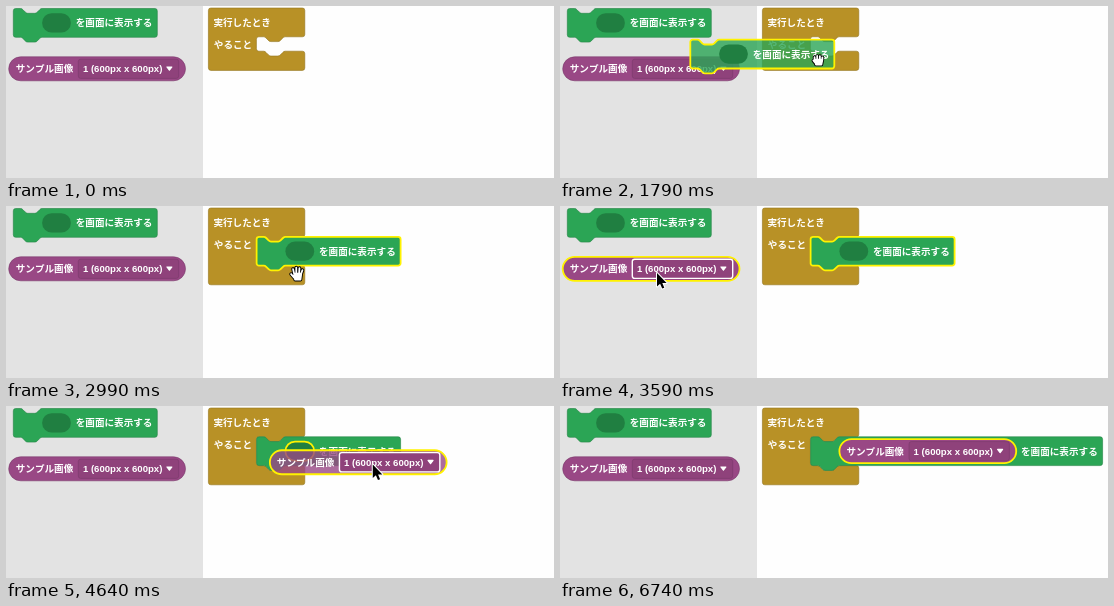
Animation, 548 px wide and 172 px high, one loop 7.04 s. Source, as an HTML page with a canvas:

```html
<!DOCTYPE html>
<html lang="ja">
<head>
<meta charset="utf-8">
<title>Block editor</title>
<style>
html, body { margin: 0; width: 100%; height: 100%; overflow: hidden; background: #fefefe; }
canvas { display: block; }
</style>
</head>
<body>
<canvas id="stage" width="548" height="172"></canvas>
<script>
const ctx = document.getElementById('stage').getContext('2d');
const LOOP = 7040, STEPS = 47;
const GLOW = '#fff200';
const GREEN = ['#2ba555', '#228444'], GOLD = ['#b89126', '#93741e'], PURPLE = ['#994885', '#7a396a'];

// Outline pieces: notch drawn rightwards and leftwards, rounded corners
const notchR = 'c1.2 0 1.8.6 2.4 1.2l2.4 2.4c.6.6 1.2 1.2 2.4 1.2h7.2c1.2 0 1.8-.6 2.4-1.2l2.4-2.4c.6-.6 1.2-1.2 2.4-1.2';
const notchL = notchR.replace(/([cl])1.2 0 1.8/, '$1-1.2 0-1.8')
  .replace('.6 2.4 1.2l2.4 2.4c.6.6 1.2 1.2 2.4 1.2h7.2c1.2 0 1.8-.6 2.4-1.2l2.4-2.4c.6-.6 1.2-1.2 2.4-1.2',
    '.6-2.4 1.2l-2.4 2.4c-.6.6-1.2 1.2-2.4 1.2h-7.2c-1.2 0-1.8-.6-2.4-1.2l-2.4-2.4c-.6-.6-1.2-1.2-2.4-1.2');
const turn = (dx, dy, sweep = 1) => `a2.4 2.4 0 0 ${sweep} ${dx * 2.4} ${dy * 2.4}`;

const stackPath = w => new Path2D(
  `M0 2.4${turn(1, -1)}H7.2${notchR}H${w - 2.4}${turn(1, 1)}V26.4${turn(-1, 1)}H28.8${notchL}H2.4${turn(-1, -1)}Z`);

const eventPath = (inner, w = 96.4) => new Path2D(
  `M0 2.4${turn(1, -1)}H${w - 2.4}${turn(1, 1)}V26.4${turn(-1, 1)}H76.8${notchL}H50.4${turn(-1, 1, 0)}` +
  `V${26.4 + inner}${turn(1, 1, 0)}H55.2${notchR}H${w - 2.4}${turn(1, 1)}V${45.6 + inner}${turn(-1, 1)}H2.4${turn(-1, -1)}Z`);

function roundPath(x, y, w, h, r) {
  const p = new Path2D();
  p.roundRect(x, y, w, h, r);
  return p;
}

const SHORT = 144, PILL = 176.8;
const pill = roundPath(0, 0, PILL, 24, 12);
const slot = roundPath(28.8, 4.8, 28.8, 19.2, 9.6);
const field = roundPath(69.6, 2.4, 100.4, 19.2, 2.4);
const caret = new Path2D('M158.2 10.2h5L160.7 13.4Z');
const arrow = new Path2D('M0 0V13.6L3.1 10.8 5.2 15.6 7.3 14.7 5.3 10H9.6Z');
const openHand = new Path2D('M-3 0L-4-4.5M-.8 0V-6M2 0L2.4-5.5M4.2 0L5.4-3.5M-3 4L-6 .5M-3 0H4.2L3.4 6H-2Z');
const closedHand = new Path2D('M-3.4 0V-2.4M-.8 0V-3.6M1.9 0V-3.4M4.4 0V-2.2M-3 3L-4.6 1M-3.4 0H4.4L3.4 5H-2Z');

function paint(path, fill, line, width = 0.6, alpha = 1) {
  ctx.globalAlpha = alpha;
  if (fill) { ctx.fillStyle = fill; ctx.fill(path); }
  ctx.globalAlpha = 1;
  if (line) { ctx.strokeStyle = line; ctx.lineWidth = width; ctx.stroke(path); }
}

// Lit blocks get a glowing edge; dragged ones a translucent body
function paintBody(path, [fill, line], lit, drag) {
  paint(path, fill, lit ? GLOW : line, lit ? 1.8 : 0.6, drag ? 0.8 : 1);
}

function label(text, x, midY) {
  ctx.fillStyle = '#fff';
  ctx.fillText(text, x, midY + 3.5);
}

function at([x, y], draw) {
  ctx.save();
  ctx.translate(x, y);
  draw();
  ctx.restore();
}

function showBlock(pos, { filled, lit, drag, target } = {}) {
  at(pos, () => {
    const extra = filled ? PILL - 28.8 : 0;
    paintBody(stackPath(SHORT + extra), GREEN, lit, drag);
    if (!filled) paint(slot, '#207f41', target && GLOW, 1.8);
    label('を画面に表示する', 62.4 + extra, 14.4);
  });
}

function imageBlock(pos, { lit, drag, hot } = {}) {
  at(pos, () => {
    paintBody(pill, PURPLE, lit, drag);
    paint(field, '#8f427b', hot ? '#fff' : PURPLE[1], hot ? 1.4 : 0.6);
    label('サンプル画像', 7, 12);
    label('1 (600px x 600px)', 74.2, 12);
    ctx.lineJoin = 'round';
    paint(caret, '#fff', '#fff', 1.2);
  });
}

function eventBlock(inner) {
  at([202.4, 2], () => {
    paintBody(eventPath(inner), GOLD);
    label('実行したとき', 5, 14.4);
    label('やること', 5.4, 36);
  });
}

function pointer(pos, kind) {
  at(pos, () => {
    ctx.lineCap = ctx.lineJoin = 'round';
    if (kind === 'arrow') {
      paint(arrow, null, '#fff', 2);
      return paint(arrow, '#000');
    }
    const hand = kind === 'open' ? openHand : closedHand;
    paint(hand, null, '#000', 3.6);
    paint(hand, '#fff', '#fff', 1.8);
  });
}

const out = p => f => 1 - (1 - f) ** p;
const late = f => f ** 3.5;
const linear = f => f;
const smooth = f => f * f * (3 - 2 * f);
const overshoot = f => f * (4.2 - 3.2 * f);

// Each mouse move starts where the one before ended; times are in steps
const START = [128, 135];
const moves = [
  { from: 3, to: 9, x: 123, y: 22, easeX: linear, easeY: out(1.2) },
  { from: 9, to: 15.6, x: 359, y: 54, easeX: out(1.4), easeY: out(7) },
  { from: 18, to: 24, x: 97, y: 67, easeX: smooth, easeY: overshoot },
  { from: 24, to: 31.5, x: 371.5, y: 56.2, easeX: out(1.5), easeY: late },
  { from: 37, to: 40, x: 429, y: 101, easeX: linear, easeY: linear },
  { from: 42, to: 45, x: 515, y: 185, easeX: linear, easeY: linear },
];

function mouseAt(k) {
  let [x, y] = START;
  for (const m of moves) {
    const f = Math.min(1, Math.max(0, (k - m.from) / (m.to - m.from)));
    x += (m.x - x) * m.easeX(f);
    y += (m.y - y) * m.easeY(f);
  }
  return [x, y];
}

// A dragged block follows the mouse slightly late
function dragged([x, y], start, k, lag) {
  const [gx, gy] = mouseAt(start), [mx, my] = mouseAt(Math.max(start, k - lag));
  return [x + mx - gx, y + my - gy];
}

const SHOW_HOME = [7.3, 2.5], IMAGE_HOME = [2.7, 50.8], NEST = [250.6, 30.8], PLUG = [279.4, 33.2];
const isNear = ([ax, ay], [bx, by]) => Math.hypot(ax - bx, ay - by) < 30;
const inside = ([px, py], [x, y], w, h) => px >= x && px <= x + w && py >= y && py <= y + h;

function draw(k) {
  const mouse = mouseAt(k), visible = k >= 3 && k < 45;
  const dragShow = k >= 10 && k < 18, dragImage = k >= 25 && k < 34;
  const free = visible && !dragShow && !dragImage;
  const nested = k >= 18, plugged = k >= 34;
  const showPos = dragged(SHOW_HOME, 9, k, 0.3), imagePos = dragged(IMAGE_HOME, 24, k, 0.5);
  const preview = dragShow && isNear(showPos, NEST);
  const overShow = free && inside(mouse, SHOW_HOME, SHORT, 28.8);
  const overImage = free && inside(mouse, IMAGE_HOME, PILL, 24);
  const overField = overImage && inside(mouse, [72.3, 53.2], 100.4, 19.2);

  ctx.fillStyle = '#fefefe';
  ctx.fillRect(0, 0, 548, 172);
  ctx.font = 'bold 9.6px "Liberation Sans", "Noto Sans CJK JP", "Noto Sans CJK", sans-serif';

  eventBlock(preview || nested ? 28.8 : 14.4);
  if (preview) at(NEST, () => paint(stackPath(SHORT), '#cbcbcb'));
  if (nested) showBlock(NEST, { filled: plugged, lit: k < 25, target: dragImage && isNear(imagePos, PLUG) });
  if (plugged) imageBlock(PLUG, { lit: true });

  ctx.fillStyle = '#e3e3e3';
  ctx.fillRect(0, 0, 197, 172);
  showBlock(SHOW_HOME, { lit: overShow });
  imageBlock(IMAGE_HOME, { lit: overImage, hot: overField });

  if (dragShow) showBlock(showPos, { lit: true, drag: true });
  if (dragImage) imageBlock(imagePos, { lit: true, drag: true, hot: true });

  if (!visible) return;
  const overNest = nested && inside(mouse, NEST, SHORT, 28.8);
  const overEvent = inside(mouse, [202.4, 2], 96.4, 76.8);
  const grab = free && !overField && (overShow || overImage || overNest || overEvent);
  pointer(mouse, dragShow ? 'closed' : grab ? 'open' : 'arrow');
}

function tick() {
  const t = performance.now() % LOOP;
  // The picture advances in even steps; the small lead absorbs rounding
  draw(Math.floor((t + 9) * STEPS / LOOP) % STEPS);
  requestAnimationFrame(tick);
}
tick();
</script>
</body>
</html>
```
